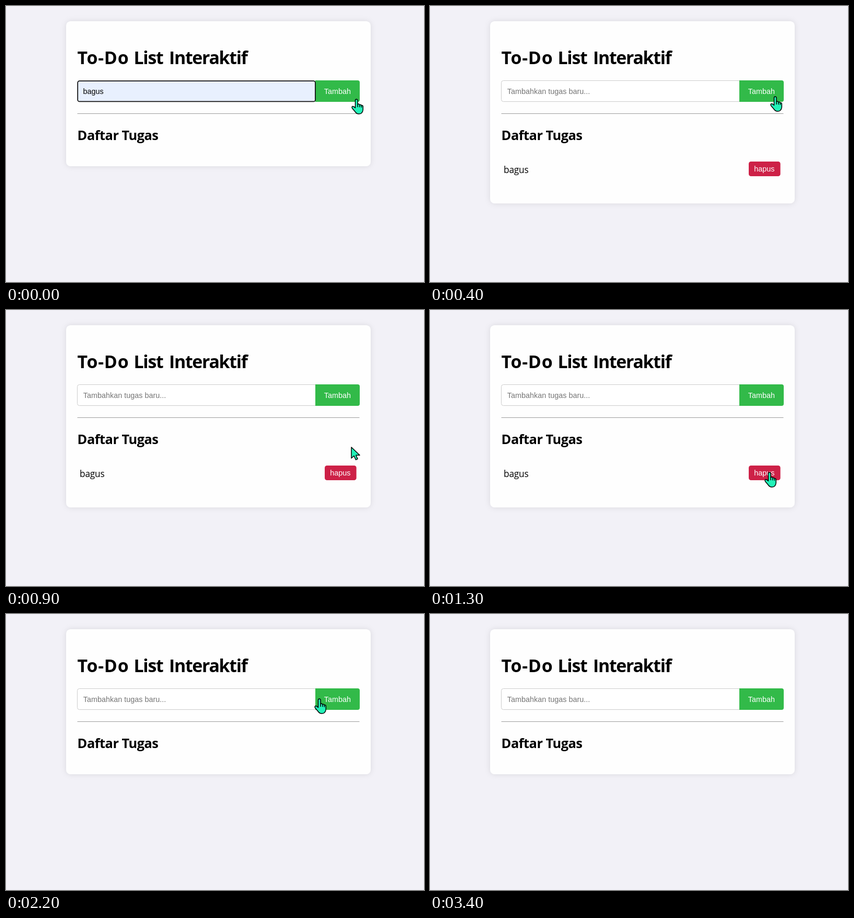
Recreate the animation shown at these times as an HTML page. Size 800 by 527 pixels, loop 3.5 s.

```html
<!DOCTYPE html>
<html lang="id">
<head>
<meta charset="utf-8">
<title>To-Do List</title>
<style>
  html, body { margin: 0; width: 100%; height: 100%; overflow: hidden; background: #f2f1f7; }
  svg { display: block; width: 800px; height: 527px; }
  text { font: 14.4px "Liberation Sans", Arial, sans-serif; }
  .ui { font-family: "Open Sans", "Noto Sans", sans-serif; }
  .h1 { font-size: 33.9px; font-weight: 700; letter-spacing: -1.3px; }
  .h1 .wide { letter-spacing: .7px; }
  .h2 { font-size: 25.4px; font-weight: 700; letter-spacing: -.5px; }
  .item { font-size: 17.3px; letter-spacing: -.2px; }
  .hint { fill: #757575; }
  .light { fill: #fff; }
  #card { fill: #fefefe; filter: drop-shadow(0 0 5.4px rgba(0, 0, 0, .1)); }
  #cursor path { fill: #22f2b8; stroke: #000; stroke-width: 1.5; stroke-linejoin: round; stroke-linecap: round; }
</style>
</head>
<body>
<svg viewBox="0 0 800 527">
  <rect id="card" x="115" y="29" width="583" height="277" rx="8.6"/>
  <text class="ui h1" y="111"><tspan class="wide" x="136.6">To-Do</tspan> <tspan x="244.5">List</tspan> <tspan x="312">Interaktif</tspan></text>

  <g id="empty">
    <path d="M592 142.5H140.5a4 4 0 0 0-4 4V178.5a4 4 0 0 0 4 4H592" fill="#fff" stroke="#ccc"/>
    <text class="hint" x="147.8" y="168">Tambahkan tugas baru...</text>
  </g>
  <path d="M592 142H673a4 4 0 0 1 4 4V179a4 4 0 0 1-4 4H592Z" fill="#32ba49"/>
  <text class="light" x="608.8" y="168">Tambah</text>
  <g id="filled">
    <rect x="137.2" y="143.2" width="454.8" height="39.2" rx="3.5" fill="#e8f0fe" stroke="#101010" stroke-width="1.8"/>
    <text x="147.4" y="168">bagus</text>
  </g>

  <rect x="136.5" y="205" width="540" height="1" fill="#9c9c9c"/>
  <text class="ui h2" x="136.6" y="256">Daftar Tugas</text>

  <g id="task">
    <text class="ui item" x="141" y="319">bagus</text>
    <rect x="610" y="297" width="60.6" height="28" rx="4.3" fill="#cd2147"/>
    <text class="light" x="620.3" y="315.5">hapus</text>
  </g>

  <g id="cursor">
    <g id="hand" transform="translate(0 -1)">
      <path d="M-2.5 16.5V2.3a2.3 2.3 0 0 1 4.6 0V9.5Q4.8 8.2 6 10.8Q8.5 9.5 9.5 12Q12.2 11.2 12.3 14V20Q12 24 9.5 26.5Q7.5 28 4.8 28H3Q-.5 27.5-3.5 23L-8.3 17.5Q-9.8 14.3-7.5 13.5Q-5.5 13.3-2.5 16.5Z"/>
      <path d="M2.1 9.5V14.5M6 10.8V14.8M9.5 12V15.3" style="fill:none"/>
    </g>
    <path id="arrow" d="M0 0V21L5 16.5L8.5 24L12 22.4L8.8 15.3H16Z"/>
  </g>
</svg>
<script>
const LOOP = 3500, TICK = 100;
const ADDED = 400, REMOVED = 1600, GONE = 2400;

// time, x, y, pointer shape; held until the next row
const moves = [
  [0, 671, 179, "hand"],
  [100, 667, 177, "hand"],
  [200, 661, 174, "hand"],
  [600, 661, 177, "hand"],
  [700, 661, 194, "arrow"],
  [800, 661, 231, "arrow"],
  [900, 661, 262, "arrow"],
  [1000, 658, 280, "arrow"],
  [1100, 654, 295, "arrow"],
  [1200, 652, 305, "hand"],
  [1300, 650, 311, "hand"],
  [REMOVED, 650, 311, "arrow"],
  [1900, 648, 305, "arrow"],
  [2000, 640, 283, "arrow"],
  [2100, 622, 232, "arrow"],
  [2200, 600, 163, "hand"],
  [2300, 568, 33, "arrow"]
];

const el = id => document.getElementById(id);
const show = (id, on) => { el(id).style.display = on ? "" : "none"; };

function draw(now) {
  const t = Math.floor(now % LOOP / TICK) * TICK;
  const listed = t >= ADDED && t < REMOVED;
  const [, x, y, shape] = moves.findLast(m => m[0] <= t);

  el("card").setAttribute("height", listed ? 348 : 277);
  show("task", listed);
  show("filled", t < ADDED);
  show("empty", t >= ADDED);
  show("cursor", t < GONE);
  show("hand", shape === "hand");
  show("arrow", shape === "arrow");
  el("cursor").setAttribute("transform", `translate(${x} ${y})`);
}

const start = performance.now();
function loop() {
  draw(performance.now() - start);
  requestAnimationFrame(loop);
}
loop();
</script>
</body>
</html>
```
